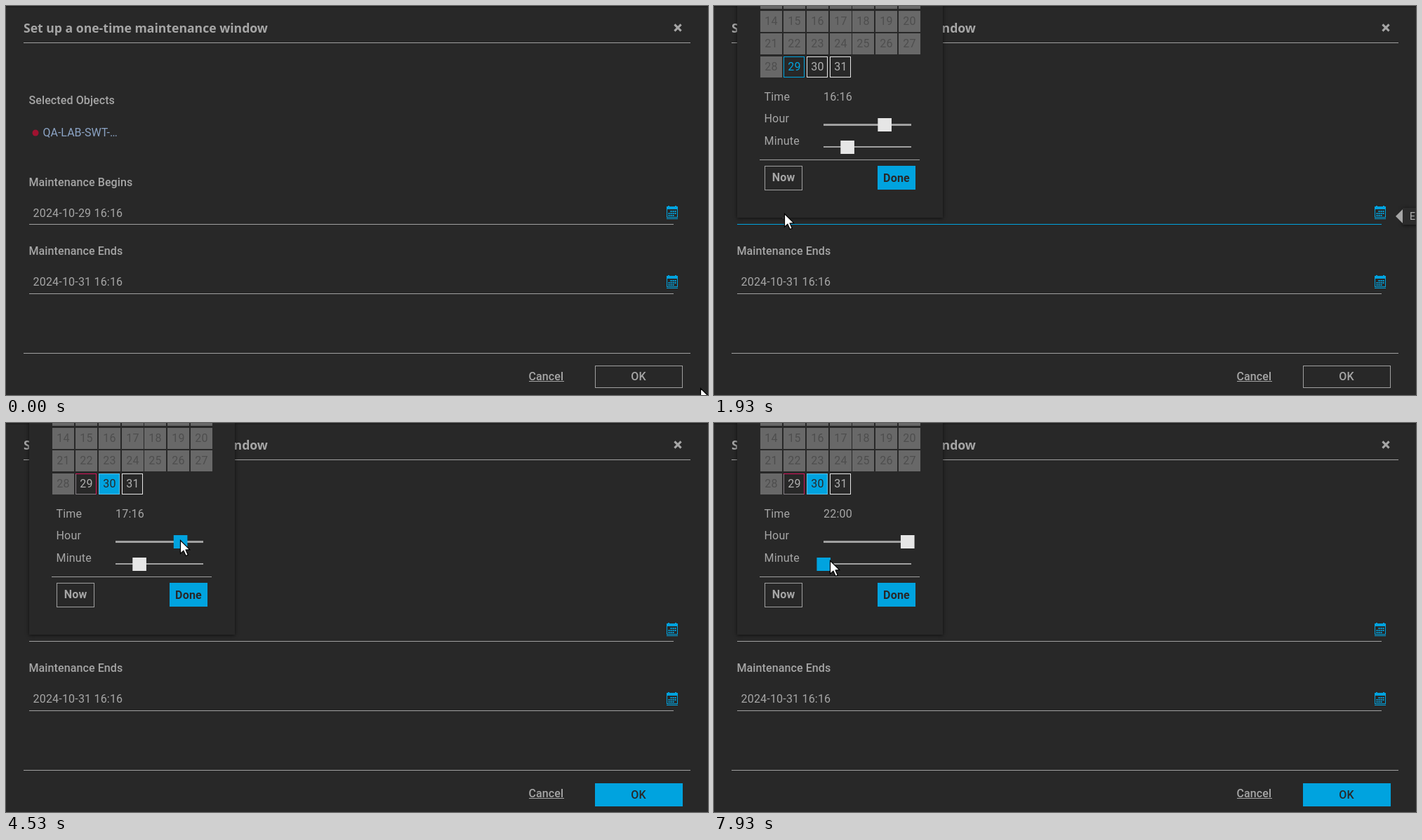
Recreate the animation shown at these times as an HTML page with a canvas. Size 1000 px wide and 555 px high, loop 8 s.

```html
<!DOCTYPE html>
<html lang="en">
<head>
<meta charset="utf-8">
<title>Maintenance window</title>
<style>
html, body { margin: 0; width: 100%; height: 100%; overflow: hidden; background: #282828; }
canvas { display: block; width: 100vw; height: 100vh; }
</style>
</head>
<body>
<canvas id="stage" width="1000" height="555"></canvas>
<script>
const ctx = document.getElementById('stage').getContext('2d');
const layer = document.createElement('canvas');
layer.width = 1000;
layer.height = 555;
const layerCtx = layer.getContext('2d');

const LOOP = 8000, STEP = 200 / 3;
const BG = '#282828', INK = '#a6a6a6', LINE = '#a0a0a0', BLUE = '#00a3df', PALE = '#e6e6e6';
const FOCUS = 1130, OPEN = 1530, PICK = 3600, REFOCUS = 3730;
const HOUR_DRAG = [4200, 6330], MINUTE_DRAG = [6930, 7530];
const TRACK = { x: 156, w: 125 };

// Pointer gestures: start time, end time, destination
const home = [989, 545];
const gestures = [
  [400, FOCUS, 98, 293],
  [1270, 1330, 98, 301],
  [1870, 2330, 183, 112],
  [2400, 2700, 224, 281],
  [2700, 3270, 150, 98],
  [3530, 4130, 242, 166],
  [HOUR_DRAG[0], 5130, 265, 168],
  [5200, 5670, 270, 169],
  [6130, HOUR_DRAG[1], 275, 170],
  [6530, 6870, 191, 199],
  [MINUTE_DRAG[0], MINUTE_DRAG[1], 150, 192],
  [7870, 7930, 165, 196]
];

const clamp = (v, a, b) => Math.max(a, Math.min(b, v));
const ease = k => k * k * k * (k * (6 * k - 15) + 10);

function pointerAt(t) {
  let [x, y] = home;
  for (const [from, to, tx, ty] of gestures) {
    const k = ease(clamp((t - from) / (to - from), 0, 1));
    x += (tx - x) * k;
    y += (ty - y) * k;
  }
  return [Math.round(x), Math.round(y)];
}

// Slider values follow the pointer while it drags
const dragX = (t, [from, to]) => pointerAt(clamp(t, from, to))[0];
const hourAt = t => Math.round((dragX(t, HOUR_DRAG) + 2.6 - TRACK.x) / TRACK.w * 23);
const minuteAt = t => Math.max(0, Math.round(16 + (dragX(t, MINUTE_DRAG) - 191) / TRACK.w * 59));

function rect(x, y, w, h, color) {
  ctx.fillStyle = color;
  ctx.fillRect(x, y, w, h);
}

function frame(x, y, w, h, color) {
  ctx.strokeStyle = color;
  ctx.lineWidth = 1;
  ctx.strokeRect(x + .5, y + .5, w - 1, h - 1);
}

function text(str, x, y, { color = INK, weight = 400, align = 'left', size = 16, family = 'Roboto', gap = .2 } = {}) {
  ctx.font = `${weight} ${size}px "${family}", sans-serif`;
  ctx.letterSpacing = gap + 'px';
  ctx.textAlign = align;
  ctx.fillStyle = color;
  ctx.fillText(str, x, y);
}

const label = (str, x, y) => text(str, x, y, { weight: 500, gap: .1 });

function polygon(points, x, y, scale = 1) {
  ctx.beginPath();
  for (let i = 0; i < points.length; i += 2) ctx.lineTo(x + points[i] * scale, y + points[i + 1] * scale);
  ctx.closePath();
}

function raised(x, y, w, h, color) {
  ctx.save();
  ctx.shadowColor = 'rgba(0,0,0,.65)';
  ctx.shadowBlur = 5;
  ctx.shadowOffsetY = 1;
  rect(x, y, w, h, color);
  ctx.restore();
}

function calendarIcon(x, y) {
  rect(x + 2, y, 2, 2, BLUE);
  rect(x + 12, y, 2, 2, BLUE);
  rect(x, y + 1, 16, 4, BLUE);
  frame(x, y + 1, 16, 16, BLUE);
  for (let r = 0; r < 3; r++)
    for (let c = 0; c < 4; c++)
      if (r + c > 0 && r + c < 5) rect(x + 2.5 + c * 3, y + 7 + r * 3, 2, 2, BLUE);
  rect(x, y + 18, 16, 1, BLUE);
}

function field(name, value, y, focused) {
  const top = Math.floor(y);
  label(name, 32.5, top + 6);
  text(value, 38.5, top + 50);
  rect(33, Math.round(y + 60), 918, 1, focused ? BLUE : LINE);
  calendarIcon(941, Math.round(y + 34));
}

function tooltip() {
  raised(981, 288, 30, 24, '#2c2c2c');
  polygon([0, 0, 10, -10, 10, 10], 971, 300);
  ctx.fillStyle = INK;
  ctx.fill();
  text('E', 991, 305, { color: '#b4b4b4', size: 14 });
}

function closeIcon(x, y, r) {
  ctx.strokeStyle = INK;
  ctx.lineWidth = 3;
  ctx.beginPath();
  for (const s of [-1, 1]) {
    ctx.moveTo(x - r, y - r * s);
    ctx.lineTo(x + r, y + r * s);
  }
  ctx.stroke();
}

function dialog(focused, picked) {
  rect(0, 0, 1000, 555, BG);
  rect(0, 0, 1000, 2, '#202020');
  text('Set up a one-time maintenance window', 25, 38, { weight: 700, size: 17.6, family: 'Open Sans', gap: 0 });
  closeIcon(957, 31, 4.6);
  rect(25, 52, 950, 1, LINE);

  label('Selected Objects', 32.5, 140);
  ctx.fillStyle = '#a01230';
  ctx.beginPath();
  ctx.arc(42, 181, 4.5, 0, 7);
  ctx.fill();
  text('QA-LAB-SWT-…', 52.5, 186, { color: '#8ba3c4', gap: 0 });

  field('Maintenance Begins', `2024-10-${picked ? 30 : 29} 16:16`, 251, focused);
  field('Maintenance Ends', '2024-10-31 16:16', 349.5, false);
  if (focused) {
    rect(98, 287, 1, 16, INK);
    tooltip();
  }

  rect(25, 495, 950, 1, LINE);
  label('Cancel', 744.5, 534);
  rect(745, 535, 50, 1, INK);
  if (picked) rect(839, 514, 125, 33, BLUE);
  else frame(839, 513, 125, 32, LINE);
  text('OK', 901, picked ? 536 : 534, { color: picked ? BG : INK, weight: 500, align: 'center' });
}

function day(n, picked) {
  const x = Math.round(66.45 + n % 7 * 32.7);
  const y = Math.round(72 + (Math.floor(n / 7) - 4) * 32.6);
  const today = n === 29, chosen = n === 30 && picked;
  let color = '#b0b0b0';
  if (n < 29) {
    rect(x, y, 31, 30, '#686868');
    color = '#4e4e4e';
  } else if (chosen) {
    rect(x, y, 30, 30, BLUE);
    frame(x, y, 30, 30, '#58bfe6');
    color = BG;
  } else if (today && picked) {
    frame(x, y, 30, 30, '#858085');
    rect(x, y, 30, 1, '#d6145c');
    rect(x + 29, y, 1, 30, '#d6145c');
  } else {
    if (today) color = BLUE;
    frame(x, y, 30, 30, today ? BLUE : PALE);
  }
  text(n, x + 15.5, y + 20, { color, align: 'center' });
}

function slider(y, part, thick, active) {
  rect(TRACK.x, Math.floor(y - thick / 2), TRACK.w, thick, LINE);
  rect(TRACK.x + TRACK.w * part - 9.6, y - 9.5, 19.6, 19, active ? BLUE : PALE);
}

function picker(t, picked) {
  const hour = hourAt(t), minute = minuteAt(t);
  raised(33, -10, 293, 312, BG);
  for (let n = 7; n <= 31; n++) day(n, picked);
  ['Time', 'Hour', 'Minute'].forEach((name, i) => text(name, 71.5, Math.round(134.7 + i * 31.6)));
  text(hour + ':' + String(minute).padStart(2, '0'), 156, 135);
  slider(169.5, hour / 23, 3, t >= 4070 && t < MINUTE_DRAG[0]);
  slider(201.5, minute / 59, 2, t >= 6870);
  rect(65, 219, 228, 1, LINE);
  frame(72, 228, 54, 35, LINE);
  text('Now', 99, 250, { weight: 700, align: 'center' });
  rect(233, 228, 54, 34, BLUE);
  text('Done', 260, 251, { color: BG, weight: 700, align: 'center' });
}

function arrow(x, y) {
  polygon([0, 0, 0, 17, 4, 13.4, 7, 20, 9.8, 18.8, 6.9, 12.4, 12, 12], x + .5, y + .5, 1.1);
  ctx.fillStyle = '#fff';
  ctx.strokeStyle = '#000';
  ctx.lineWidth = 1.2;
  ctx.fill();
  ctx.stroke();
}

function hand(x, y) {
  ctx.beginPath();
  for (let i = 0; i < 4; i++) {
    const drop = i && 8 + i * .8;
    ctx.roundRect(x - 1 + i * 3.6, y + drop, 4, 18 - drop, 2);
  }
  ctx.roundRect(x - 1, y + 13, 14.8, 14, [0, 0, 4, 4]);
  ctx.roundRect(x - 4.5, y + 13, 5, 9, 2.5);
  ctx.strokeStyle = '#000';
  ctx.lineWidth = 2;
  ctx.stroke();
  ctx.fillStyle = '#fff';
  ctx.fill();
  for (let i = 1; i < 4; i++) rect(x - 1 + i * 3.6, y + 11, .8, 5, '#555');
}

function draw(now) {
  // The picture advances in steps; the small offset keeps times clear of step edges
  const t = Math.floor((now % LOOP + 4) / STEP) * STEP + 4;
  const picked = t >= PICK;
  const focused = t >= FOCUS && t < PICK || t >= REFOCUS && t < HOUR_DRAG[0] + STEP;
  const fade = t < OPEN ? 0 : clamp(.55 + .32 * Math.floor((t - OPEN) / STEP), 0, 1);

  dialog(focused, picked);
  if (fade > 0) {
    layerCtx.drawImage(ctx.canvas, 0, 0);
    picker(t, picked);
    ctx.globalAlpha = 1 - fade;
    ctx.drawImage(layer, 0, 0);
    ctx.globalAlpha = 1;
  }

  const [x, y] = pointerAt(t);
  const overDay = fade === 1 && x >= 99 && x <= 196 && y >= 72 && y <= 102;
  (overDay ? hand : arrow)(x, y);
}

const start = performance.now();
function tick() {
  draw(performance.now() - start);
  requestAnimationFrame(tick);
}
tick();
</script>
</body>
</html>
```
